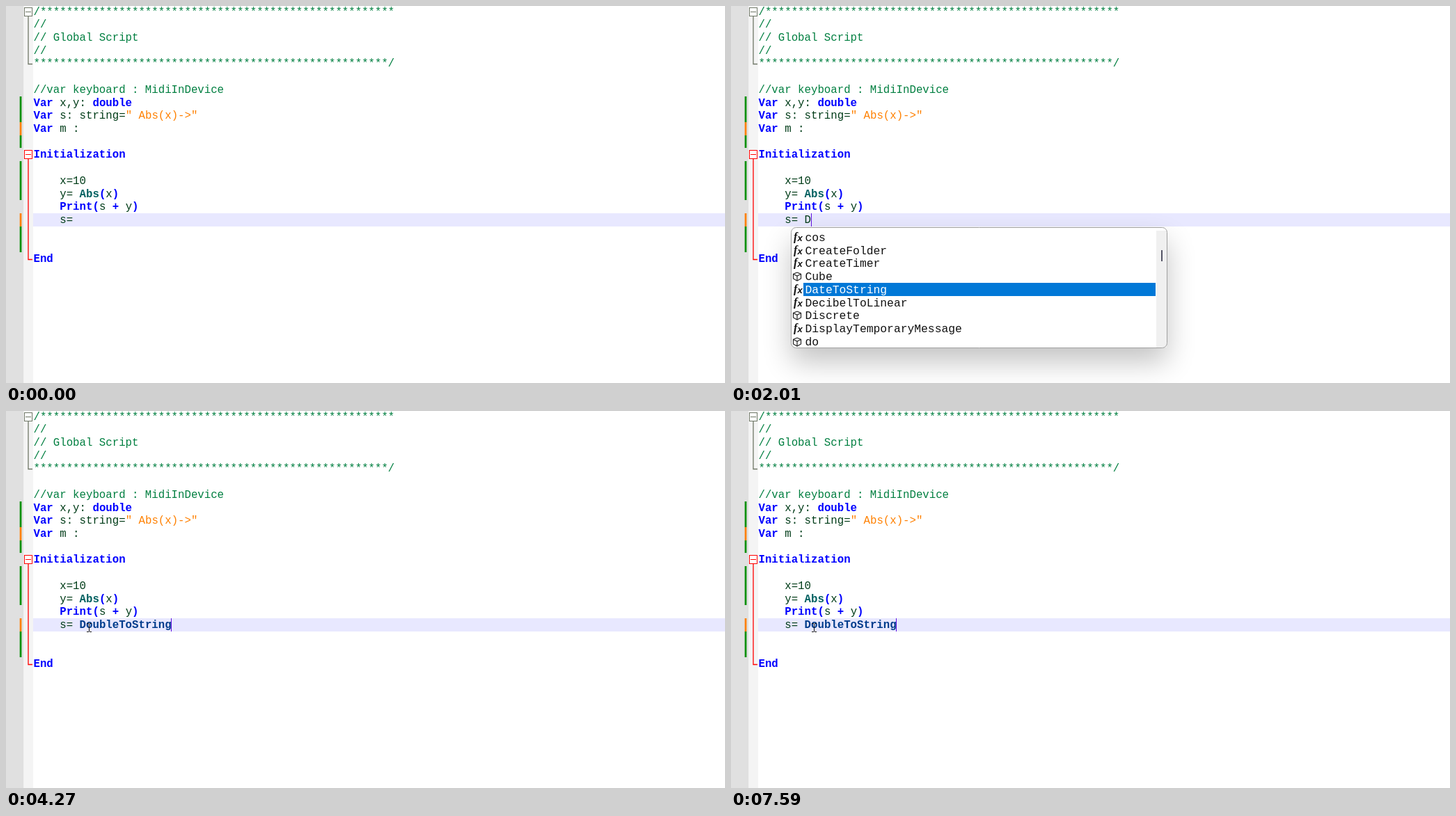
Recreate the animation shown at these times as an HTML page with a canvas. Size 1033x542 px, loop 8 s.

```html
<!DOCTYPE html>
<html lang="en">
<head>
<meta charset="utf-8">
<title>Code completion</title>
<style>
html, body { margin: 0; width: 100%; height: 100%; overflow: hidden; background: #fff; }
canvas { display: block; }
</style>
</head>
<body>
<canvas id="stage" width="1033" height="542"></canvas>
<script>
const ctx = document.getElementById('stage').getContext('2d');
const LOOP = 8000, LEFT = 39.5, PITCH = 18.72, CODE_SIZE = 15.73, LIST_SIZE = 16.33;
const MONO = '"Courier New", "Liberation Mono", monospace';
const CHAR = CODE_SIZE * 0.6001;
const GREEN = '#009000', ORANGE = '#ff8000', CARET = '#6010e0';

const STYLES = {
  comment: ['#007f40', ''],
  keyword: ['#0000ff', 'bold'],
  plain: ['#003c18', ''],
  string: [ORANGE, ''],
  builtin: ['#006060', 'bold'],
  func: ['#003c8c', 'bold'],
};
const comment = s => [['comment', s]];
const keyword = s => ['keyword', s];
const plain = s => ['plain', s];

const stars = '*'.repeat(54);
const CODE = {
  0: comment('/' + stars),
  1: comment('//'),
  2: comment('// Global Script'),
  3: comment('//'),
  4: comment(stars + '/'),
  6: comment('//var keyboard : MidiInDevice'),
  7: [keyword('Var'), plain(' x,y: '), keyword('double')],
  8: [keyword('Var'), plain(' s: string='), ['string', '" Abs(x)->"']],
  9: [keyword('Var'), plain(' m :')],
  11: [keyword('Initialization')],
  13: [plain('    x=10')],
  14: [plain('    y= '), ['builtin', 'Abs'], keyword('('), plain('x'), keyword(')')],
  15: [keyword('    Print('), plain('s '), keyword('+'), plain(' y'), keyword(')')],
  19: [keyword('End')],
};

// [first line, line after the last, colour]
const CHANGE_BARS = [[7, 9, GREEN], [9, 10, ORANGE], [10, 11, GREEN],
  [12, 15, GREEN], [16, 17, ORANGE], [17, 19, GREEN]];

const ITEMS = ['cos', 'CreateFolder', 'CreateTimer', 'Cube', 'DateToString',
  'DecibelToLinear', 'Discrete', 'DisplayTemporaryMessage', 'do', 'double',
  'DoubleToString', 'DuplicateSelectedPlugin', 'EA_AddArgument',
  'EA_ClearAllArgs', 'EA_SetProgramName'];
const TYPES = ['Discrete', 'do', 'double', 'Cube'];

const CARET_ON = [[1080, 1680], [2010, 3270], [3870, 4480], [5070, 6060], [6660, 7320], [7590, 8000]];
const POINTER_ON = [[130, 1950], [3670, 5470], [6060, 8000]];

const within = (t, spans) => spans.some(([a, b]) => t >= a && t < b);
const lineTop = n => Math.round(n * PITCH - 1.5);

function rect(x, y, w, h, color) {
  ctx.fillStyle = color;
  ctx.fillRect(x, y, w, h);
}

function stroke(color, points, width = 1) {
  ctx.strokeStyle = color;
  ctx.lineWidth = width;
  ctx.beginPath();
  points.forEach(([x, y], i) => i ? ctx.lineTo(x, y) : ctx.moveTo(x, y));
  ctx.stroke();
}

function text(s, x, y, color, weight = '', size = CODE_SIZE) {
  ctx.font = `${weight} ${size}px ${MONO}`;
  ctx.fillStyle = color;
  ctx.fillText(s, x, y);
}

function codeLine(n, tokens) {
  let column = 0;
  for (const [style, s] of tokens) {
    text(s, LEFT + column * CHAR, lineTop(n) + 14, ...STYLES[style]);
    column += s.length;
  }
}

function fold(first, last, color) {
  const y = lineTop(first) + 9.5, end = lineTop(last) + 10.5;
  rect(26, y - 6, 12, 12, '#fff');
  ctx.strokeStyle = color;
  ctx.lineWidth = 1;
  ctx.strokeRect(26.5, y - 6, 11, 12);
  stroke(color, [[28, y], [36, y]]);
  stroke(color, [[32, y + 6], [32, end], [38, end]], 1.3);
}

function editor() {
  rect(0, 0, 1033, 542, '#fff');
  rect(0, 0, 25.5, 542, '#e0e0e0');
  rect(25.5, 0, 13.5, 542, '#f4f4f4');
  rect(39, 298, 994, 19, '#e8e8ff');
  for (const [a, b, color] of CHANGE_BARS) {
    rect(19.7, lineTop(a), 2.7, lineTop(b) - lineTop(a), color);
  }
  fold(0, 4, '#707868');
  fold(11, 19, '#ff0000');
  for (const n in CODE) codeLine(+n, CODE[n]);
}

function typedTokens(t) {
  if (t < 2010) return [plain('    s= ')];
  if (t < 4270) return [plain('    s= ' + 'Dou'.slice(0, t < 2280 ? 1 : t < 2680 ? 2 : 3))];
  const tokens = [plain('    s= '), ['func', 'DoubleToString']];
  if (t >= 5470 && t < 7590) tokens.push(plain('('));
  return tokens;
}

function icon(name, y) {
  if (TYPES.includes(name)) {
    stroke('#222', [[95, y - 6], [100.5, y - 3.5], [100.5, y + 3], [95, y + 6],
      [89.5, y + 3], [89.5, y - 3.5], [95, y - 6]], 1.2);
    stroke('#222', [[89.5, y - 3.5], [95, y - 1], [100.5, y - 3.5]], 1.2);
    stroke('#222', [[95, y - 1], [95, y + 6]], 1.2);
  } else {
    ctx.fillStyle = '#111';
    ctx.font = 'italic bold 16px "Liberation Serif", serif';
    ctx.fillText('f', 90, y + 4);
    ctx.font = 'italic bold 13px "Liberation Sans", sans-serif';
    ctx.fillText('x', 95.5, y + 5);
  }
}

function popup(t) {
  const selected = t < 2280 ? 'DateToString' : t < 2680 ? 'do' : t < 3740 ? 'double' : 'DoubleToString';
  const first = ITEMS.indexOf(selected) - 4;
  ctx.save();
  ctx.beginPath();
  ctx.roundRect(86.5, 318.5, 540, 173, 7);
  ctx.shadowColor = 'rgba(0,0,0,.24)';
  ctx.shadowBlur = 40;
  ctx.shadowOffsetY = 20;
  ctx.fillStyle = '#fff';
  ctx.fill();
  ctx.restore();
  rect(611, 323, 15, 168, '#f0f0f0');
  rect(618, t < 2280 ? 351 : 354, 2, 16, '#555566');
  rect(104, 398, 506, 19, '#0078d7');
  ITEMS.slice(first, first + 9).forEach((name, i) => {
    const y = Math.round(333 + i * PITCH);
    icon(name, y);
    text(name, 106.5, y + 5, name === selected ? '#fff' : '#111', '', LIST_SIZE);
  });
  ctx.beginPath();
  ctx.roundRect(86.5, 318.5, 540, 173, 7);
  ctx.strokeStyle = '#a0a0a0';
  ctx.lineWidth = 1;
  ctx.stroke();
}

function callTip() {
  rect(242, 318, 624, 39, '#fff');
  stroke('#c0c0c0', [[242.5, 356], [242.5, 318.5], [865, 318.5]]);
  stroke('#000', [[242, 356.5], [865.5, 356.5], [865.5, 318]]);
  const before = 'String DoubleToString (', active = 'd : double';
  const x = 247;
  text(before, x, 332, '#808080');
  text(active, x + before.length * CHAR, 332, '#000080');
  text(', places : int)', x + (before + active).length * CHAR, 332, '#808080');
  text('Converts a double to a string with the specified number of places', x, 350, '#808080');
}

function pointer(t) {
  // The pointer moves in 12 discrete steps, easing out to its resting place.
  const step = Math.min(11, Math.floor((t - 130) / 68.2));
  const rest = (1 - step / 11) ** 2;
  const x = Math.round(119 + 634 * rest) + 0.5;
  const y = Math.round(311 + 206 * rest);
  if (t >= 1010 && t < 1220) {
    ctx.fillStyle = 'rgba(255,255,0,.5)';
    ctx.beginPath();
    ctx.arc(117, 309, 12, 0, 2 * Math.PI);
    ctx.fill();
  }
  stroke('#111', [[x, y - 5], [x, y + 6]]);
  for (const edge of [y - 5.5, y + 6.5]) {
    stroke('#111', [[x - 3.5, edge], [x - 0.5, edge]]);
    stroke('#111', [[x + 0.5, edge], [x + 3.5, edge]]);
  }
}

function render(t) {
  editor();
  const tokens = typedTokens(t);
  codeLine(16, tokens);
  if (within(t, CARET_ON)) {
    const columns = tokens.reduce((sum, [, s]) => sum + s.length, 0);
    rect(Math.floor(LEFT + columns * CHAR), 298, 1, 19, CARET);
  }
  if (t >= 2010 && t < 4270) popup(t);
  if (t >= 5530 && t < 7590) callTip();
  if (within(t, POINTER_ON)) pointer(t);
}

const start = performance.now();
function frame() {
  render((performance.now() - start) % LOOP);
  requestAnimationFrame(frame);
}
frame();
</script>
</body>
</html>
```
